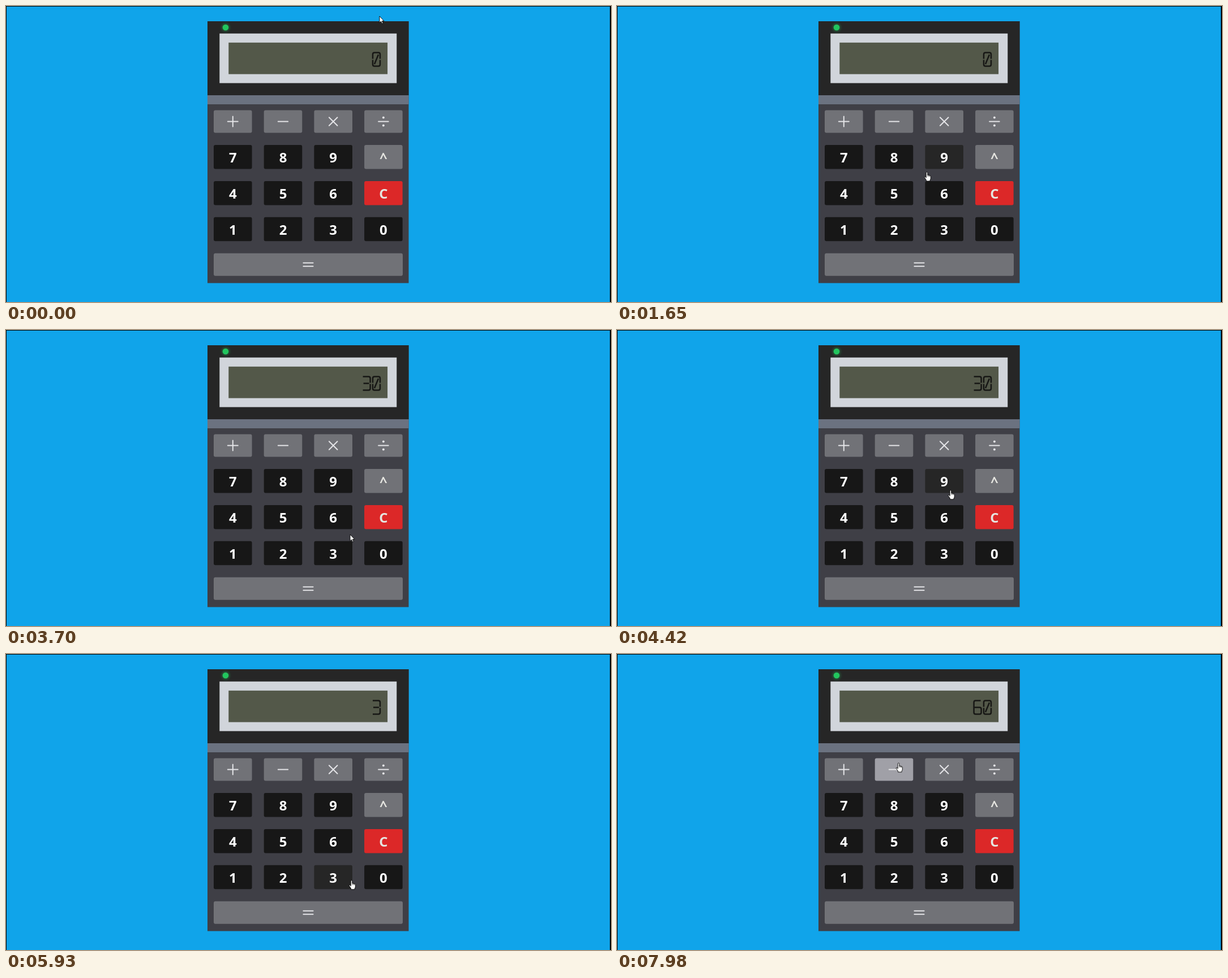
An HTML page for the animation above (8000 ms loop, 1069 by 524 pixels).

```html
<!DOCTYPE html>
<html lang="en">
<head>
<meta charset="utf-8">
<title>Calculator</title>
<style>
html, body { margin: 0; width: 100%; height: 100%; overflow: hidden; background: #000; }
svg { display: block; width: 100%; height: 100%; }
text { font: 700 24px "Open Sans", "Noto Sans", sans-serif; text-anchor: middle; }
.line { fill: none; stroke: #e4e4e7; stroke-width: 2; stroke-linecap: round; }
</style>
</head>
<body>
<svg viewBox="0 0 1069 524">
  <defs>
    <filter id="glow" x="-100%" y="-100%" width="300%" height="300%"><feGaussianBlur stdDeviation="2.5"/></filter>
  </defs>
  <rect x="1" y="1" width="1066" height="523" fill="#10a4ea"/>
  <rect x="356" y="27" width="355.5" height="463.5" fill="#3f3f46"/>
  <rect x="356" y="27" width="355.5" height="131" fill="#262626"/>
  <circle cx="388" cy="38" r="6" fill="#22c55e" opacity=".6" filter="url(#glow)"/>
  <circle cx="388" cy="38" r="5.3" fill="#22c55e"/>
  <rect x="377.3" y="48.7" width="313" height="87.8" fill="#d1d5db"/>
  <rect x="393.3" y="64.8" width="280.8" height="55.8" fill="#535849"/>
  <rect x="356" y="158" width="355.5" height="16" fill="#6b7280"/>
  <g id="keys"></g>
  <g id="digits" fill="none" stroke="#171715" stroke-width="2.5"></g>
  <g id="cursor" stroke="#000" stroke-width=".9" stroke-linejoin="round" fill="#fff">
    <path id="arrow" d="M0 0V11.6L2.6 9.2L4.5 13.3L6.3 12.5L4.5 8.6H8Z"/>
    <g id="hand">
      <path d="M-1.3 9V1.2Q-1.3 0 0 0Q1.3 0 1.3 1.2V5L5.6 6Q6.8 6.4 6.8 8V11Q6.8 13 5.6 14.2V16H-1V14.2L-4 9.8Q-4.7 8.2 -3.4 7.9Q-2.5 7.8 -1.3 10Z"/>
      <path fill="none" stroke-width=".6" d="M1.3 5V8M3.2 5.6V8.2M5 6V8.4"/>
    </g>
  </g>
</svg>
<script>
const LOOP = 8000, HOVER_LAG = 50, PRESS_LEAD = 40;
const $ = id => document.getElementById(id);

const colors = {
  op: ["#717277", "#a0a0a7"],
  num: ["#171717", "#262626"],
  clear: ["#dc2828", "#ef4444"]
};
const icons = {
  "+": "M-9 0H9M0 -9V9",
  "-": "M-8.7 0H8.7",
  "x": "M-7.3 -7.3L7.3 7.3M7.3 -7.3L-7.3 7.3",
  "/": "M-8.8 0H8.8",
  "=": "M-8.6 -3H8.6M-8.6 3H8.6"
};
// Display strokes in a 13 by 24 cell
const glyphs = {
  0: "M0 11V3Q0 0 3 0H10Q13 0 13 3V11M0 13V21Q0 24 3 24H10Q13 24 13 21V13M3 20.5L10 3.5",
  1: "M13 0V11M13 13V24",
  2: "M0 0H10Q13 0 13 3V9Q13 12 10 12H3Q0 12 0 15V21Q0 24 3 24H13",
  3: "M0 0H10Q13 0 13 3V11M1 12H11M13 13V21Q13 24 10 24H0",
  5: "M13 0H0V9Q0 12 3 12H10Q13 12 13 15V21Q13 24 10 24H0",
  6: "M12 0H3Q0 0 0 3V21Q0 24 3 24H10Q13 24 13 21V15Q13 12 10 12H0"
};

// Pointer stops; a key is pressed just before the pointer leaves
const stops = [
  { at: 0, x: 660, y: 18 },
  { at: 430, leave: 520, x: 402, y: 393, key: "1" },
  { at: 840, leave: 980, x: 488, y: 331, key: "5" },
  { at: 1240, leave: 1400, x: 569, y: 207, key: "x" },
  { at: 1650, x: 547.5, y: 294 },
  { at: 1945, leave: 2540, x: 490, y: 390, key: "2" },
  { at: 2790, leave: 3030, x: 512.5, y: 444, key: "=" },
  { at: 3370, leave: 3540, x: 630, y: 430 },
  { at: 3700, x: 608, y: 362 },
  { at: 4000, x: 655, y: 300 },
  { at: 4330, x: 600, y: 289 },
  { at: 4940, leave: 5060, x: 424, y: 202, key: "+" },
  { at: 5580, leave: 5740, x: 580, y: 402, key: "3" },
  { at: 6180, leave: 6340, x: 656, y: 399, key: "0" },
  { at: 6670, leave: 6970, x: 621.5, y: 441.5, key: "=" },
  { at: 7030, leave: 7330, x: 625, y: 447 },
  { at: 7980, x: 497.5, y: 193 }
];

function add(parent, tag, attrs, label = "") {
  const el = document.createElementNS("http://www.w3.org/2000/svg", tag);
  for (const k in attrs) el.setAttribute(k, attrs[k]);
  el.textContent = label;
  return parent.appendChild(el);
}

const keys = ["+-x/", "789^", "456C", "1230", "="].flatMap((line, r) => [...line].map((label, c) => {
  const kind = label === "C" ? "clear" : /\d/.test(label) ? "num" : "op";
  const x = 367 + 88.7 * c, y = r ? 182.1 + 63.9 * r : 184.5;
  const w = label === "=" ? 334 : 67.6, h = r % 4 ? 42.5 : 40;
  const box = add($("keys"), "rect", { x, y, width: w, height: h, rx: 3 });
  const cx = x + w / 2, cy = y + h / 2;
  if (icons[label]) {
    const g = add($("keys"), "g", { transform: `translate(${cx} ${cy})` });
    add(g, "path", { d: icons[label], class: "line" });
    if (label === "/") for (const s of [-7, 7]) add(g, "circle", { cy: s, r: 2, fill: "#e4e4e7" });
  } else {
    add($("keys"), "text", { x: cx, y: y + 31.2, fill: kind === "num" ? "#fff" : "#e5e5e0" }, label);
  }
  return { box, x, y, w, h, fill: colors[kind] };
}));

function pointer(t) {
  const i = stops.findIndex(s => s.at > t);
  const b = stops[i < 0 ? stops.length - 1 : i], a = stops[i - 1] || b;
  const from = a.leave || a.at;
  const k = Math.min(1, Math.max(0, (t - from) / (b.at - from || 1)));
  const ease = k * k * (3 - 2 * k);
  return [a.x + (b.x - a.x) * ease, a.y + (b.y - a.y) * ease];
}

function reading(t) {
  let shown = 0, stored = 0, op = "";
  for (const { leave, key } of stops) {
    if (!key || leave - PRESS_LEAD > t) continue;
    if (key === "=") shown = op === "x" ? stored * shown : stored + shown;
    else if (icons[key]) [stored, shown, op] = [shown, 0, key];
    else shown = shown * 10 + +key;
  }
  return String(shown);
}

function showNumber(text) {
  if ($("digits").dataset.text === text) return;
  $("digits").dataset.text = text;
  $("digits").replaceChildren();
  [...text].reverse().forEach((ch, i) =>
    add($("digits"), "path", { d: glyphs[ch], transform: `translate(${648 - 17.4 * i} 82.5)` }));
}

function render(t) {
  const [x, y] = pointer(t), [hx, hy] = pointer(Math.max(0, t - HOVER_LAG));
  let over = false;
  for (const k of keys) {
    const hit = hx >= k.x && hx <= k.x + k.w && hy >= k.y && hy <= k.y + k.h;
    over = over || hit;
    k.box.setAttribute("fill", k.fill[+hit]);
  }
  $("cursor").setAttribute("transform", `translate(${x} ${y})`);
  $("arrow").setAttribute("display", over ? "none" : "inline");
  $("hand").setAttribute("display", over ? "inline" : "none");
  showNumber(reading(t));
}

const start = performance.now();
function tick() {
  render((performance.now() - start) % LOOP);
  requestAnimationFrame(tick);
}
tick();
</script>
</body>
</html>
```
